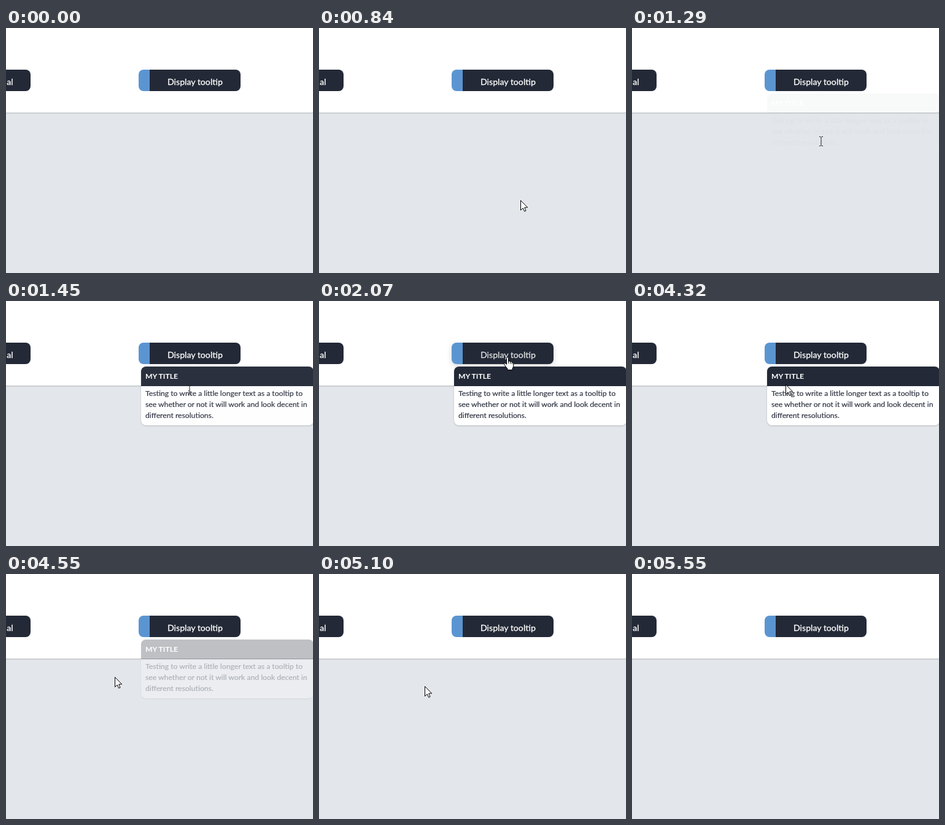
These frames come from a looping animation (500x400 px, 6.4 s). An HTML page:

```html
<!DOCTYPE html>
<html lang="en">
<head>
<meta charset="utf-8">
<title>Tooltip demo</title>
<style>
  html, body { margin: 0; width: 100%; height: 100%; overflow: hidden; background: #e3e6eb; }
  svg { display: block; width: 500px; height: 400px; font-family: Lato, "Open Sans", sans-serif; }
  .card { filter: drop-shadow(0 1px 1px rgba(0, 0, 0, .2)); }
  .dark { fill: #232936; }
  .label { font-size: 14.15px; fill: #fff; stroke: #fff; stroke-width: .3px; }
  .tip { font-size: 12.2px; filter: drop-shadow(0 1px 1px rgba(0, 0, 0, .2)); }
  .body { fill: #2d3240; stroke: #2d3240; stroke-width: .2px; }
  .title { font-weight: 700; fill: #fff; }
  .cursor path { fill: #fff; stroke: #000; stroke-linejoin: round; }
  .cursor #beam { fill: none; stroke: #222; }
</style>
</head>
<body>
<svg viewBox="0 0 500 400">
  <rect class="card" x="-20" y="-20" width="521" height="158" rx="4" fill="#fff"/>

  <rect class="dark" x="-126" y="68" width="166" height="35" rx="8"/>
  <text class="label" x="11.5" y="93" text-anchor="end">al</text>

  <g id="button">
    <path class="dark" d="M234 68H374a8 8 0 0 1 8 8V95a8 8 0 0 1-8 8H234Z"/>
    <path fill="#5b95d1" d="M234 68H224a8 8 0 0 0-8 8V95a8 8 0 0 0 8 8H234Z"/>
  </g>
  <text id="caption" class="label" x="263" y="93">Display tooltip</text>

  <g id="tip" class="tip">
    <rect x="220" y="107" width="281" height="96" rx="8" fill="#fff"/>
    <path class="dark" d="M220 139V115a8 8 0 0 1 8-8H493a8 8 0 0 1 8 8V139Z"/>
    <text class="title" x="227" y="127">MY TITLE</text>
    <g class="body">
      <text x="227" y="155">Testing to write a little longer text as a tooltip to</text>
      <text x="227" y="173">see whether or not it will work and look decent in</text>
      <text x="227" y="191">different resolutions.</text>
    </g>
  </g>

  <g id="cursor" class="cursor">
    <path id="arrow" d="M.5.5V16.5L4.2 13 6.6 18.4 9 17.4 6.7 12H11.7Z"/>
    <path id="beam" d="M-3-7.5H-1L0-6.5 1-7.5H3M0-6.5V6.5M-3 7.5H-1L0 6.5 1 7.5H3"/>
    <path id="hand" d="M-1.5 12V2.5Q-1.5.5 0 .5T1.5 2.5V7.5Q3.5 6.5 4.5 8 6.5 7.3 7.3 9 9.7 8.5 9.7 11V15Q9.7 17 8 19V21.5H0V19.5Q-2 17.5-5 13-6 11-4.5 10.5-3 10.5-1.5 12.5ZM1.5 7.5V11M4.5 8V11.5M7.3 9V12"/>
  </g>
</svg>
<script>
const LOOP = 6400;
const $ = id => document.getElementById(id);

// Pointer moves: each passes its points at even times, in held steps
const moves = [
  { from: 530, to: 2070, steps: 20,
    points: [[397, 385], [328, 281], [312, 201], [299, 145], [305, 100], [307, 91]] },
  { from: 3850, to: 4710, steps: 11,
    points: [[306, 93], [300, 103], [262, 130], [187, 162], [168, 178]] },
  { from: 5100, to: 5550, steps: 6,
    points: [[172, 183], [238, 252], [335, 338], [430, 410]] }
];

const ease = p => 1 - (1 - Math.min(1, Math.max(0, p))) ** 2.2;
const pulse = (t, on, off, length) => ease((t - on) / length) - ease((t - off) / length);

// Smooth curve through the points, u from 0 to 1
function along(points, u) {
  const last = points.length - 1;
  const i = Math.min(last - 1, Math.floor(u * last)), f = u * last - i;
  const at = k => points[Math.min(last, Math.max(0, k))];
  return [0, 1].map(axis => {
    const [a, b, c, d] = [-1, 0, 1, 2].map(k => at(i + k)[axis]);
    return Math.round(b + f / 2 * (c - a + f * (2 * a - 5 * b + 4 * c - d + f * (3 * (b - c) + d - a))));
  });
}

function cursorKind(x, y) {
  if (x >= 216 && x < 382 && y >= 68 && y <= 103) return "hand";
  return x >= 227 && x < 490 && y > 142 && y < 196 ? "beam" : "arrow";
}

function draw(now) {
  const time = now % LOOP;
  const move = moves.findLast(m => time >= m.from);
  let t = 0, shown = "";
  if (move) {
    const { from, to, steps, points } = move;
    const u = Math.min(1, Math.floor((time - from + 5) / (to - from) * steps) / steps);
    t = from + u * (to - from);
    if (move !== moves.at(-1) || u < 1) {
      const [x, y] = along(points, u);
      shown = cursorKind(x, y);
      $("cursor").setAttribute("transform", `translate(${x} ${y})`);
    }
  }
  for (const id of ["arrow", "beam", "hand"]) $(id).style.display = id === shown ? "" : "none";

  const hover = pulse(t, 1650, 4000, 200);
  $("button").style.filter = hover ? `drop-shadow(0 3px 4px rgba(0,0,0,${.16 * hover}))` : "none";
  $("caption").style.opacity = 1 - .15 * hover;
  $("tip").style.opacity = pulse(t, 1220, 4425, 300);
}

let begin;
function tick(now) {
  begin ??= now;
  draw(now - begin);
  requestAnimationFrame(tick);
}
draw(0);
requestAnimationFrame(tick);
</script>
</body>
</html>
```
